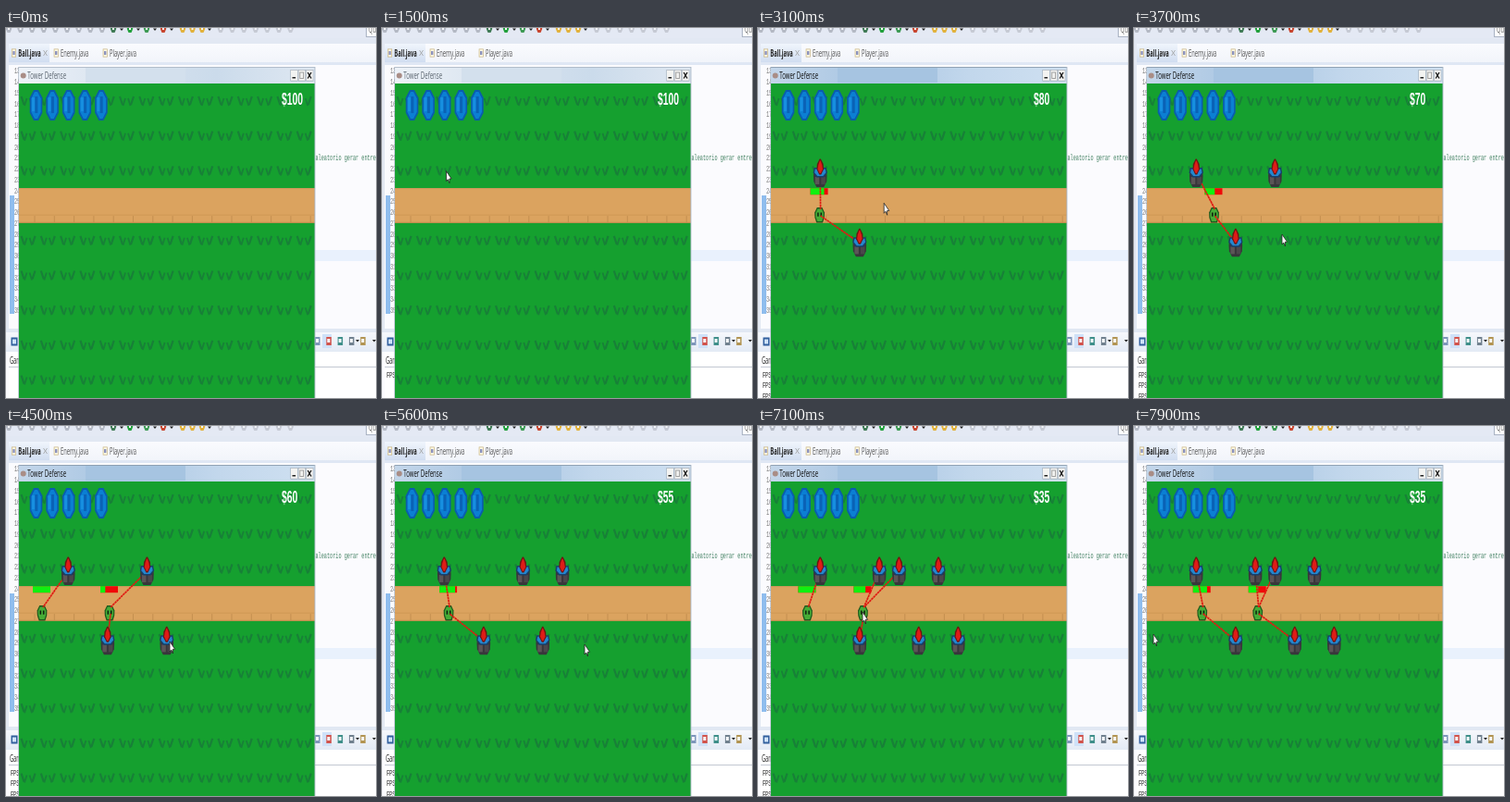
Write an HTML page with a canvas that moves like this. It is 400 px wide and 400 px high and loops after 8000 ms.

```html
<!DOCTYPE html>
<html lang="en">
<head>
<meta charset="utf-8">
<title>Tower Defense</title>
<style>
html, body { margin: 0; width: 100%; height: 100%; overflow: hidden; background: #fbfbfe; }
canvas { display: block; width: 400px; height: 400px; }
</style>
</head>
<body>
<canvas id="stage" width="400" height="400"></canvas>
<script>
const LOOP = 8000, STEP = 100, RANGE = 62;
const SQUEEZE = 0.565;              // the whole screen is narrowed sideways
const TILE_W = 21.3, TILE_H = 37.7;
const LEFT = 14, RIGHT = 334, WIDTH = RIGHT - LEFT, TITLE = 42, TOP = 60;
const LANE = 202;
const UI = '"Open Sans", sans-serif';
const MONO = '9.2px "Liberation Mono", monospace';
const stage = document.getElementById('stage').getContext('2d');
let c;

function box(color, x, y, w, h) {
  c.fillStyle = color;
  c.fillRect(x, y, w, h);
}

// Mirrored outline: half widths at even steps from top to bottom.
function shape(color, x, top, bottom, ...halves) {
  const y = i => top + (bottom - top) * i / (halves.length - 1);
  c.fillStyle = color;
  c.beginPath();
  halves.forEach((h, i) => c.lineTo(x + h, y(i)));
  for (let i = halves.length - 1; i >= 0; i--) c.lineTo(x - halves[i], y(i));
  c.fill();
}

function line(color, width, x0, y0, x1, y1) {
  c.strokeStyle = color;
  c.lineWidth = width;
  c.beginPath();
  c.moveTo(x0, y0);
  c.lineTo(x1, y1);
  c.stroke();
}

function text(str, x, y, font, color) {
  c.save();
  c.translate(x, y);
  c.scale(SQUEEZE, 1);
  c.font = font;
  c.fillStyle = color;
  c.fillText(str, 0, 0);
  c.restore();
}

function fade(x0, y0, x1, y1, ...colors) {
  const g = c.createLinearGradient(x0, y0, x1, y1);
  colors.forEach((k, i) => g.addColorStop(i / (colors.length - 1), k));
  return g;
}

function layer(draw) {
  const el = document.createElement('canvas');
  el.width = el.height = 400;
  c = el.getContext('2d');
  draw();
  return el;
}

// ---- editor behind the game ----

function arrow(x, y) {
  shape('#222', x, y - 1, y + 1.5, 2, 0);
}

function toolIcon(color, x) {
  shape(color, x, -3, 5, 3, 3.2, 1.5);
  box('#f4f6fa', x - 1, 0, 2, 2);
}

function toolbar() {
  box('#e4e9f4', 0, 0, 400, 11);
  for (let x = 3; x < 108; x += 12.6) toolIcon('#b4b9c4', x);
  for (let x = 232; x < 310; x += 12.6) toolIcon('#c6cad4', x);
  ['#3f7a55', '#22a03c', '#3d9a54', '#c8452f'].forEach((color, i) => {
    toolIcon(color, 116 + 18 * i);
    arrow(125 + 18 * i, 1.5);
  });
  for (let i = 0; i < 3; i++) toolIcon('#e2b23c', 191 + 10.5 * i);
  arrow(220, 1.5);
  box('#aab3c4', 389, 0, 11, 10);
  box('#fff', 390, 0, 10, 9);
  text('Qu', 392, 5, '10px ' + UI, '#666');
}

function tab(name, x, weight, color) {
  box('#cbb682', x - 7.3, 22.5, 5, 9);
  box('#fdf8e4', x - 6.6, 23.2, 3.6, 7.6);
  box('#8d93bd', x - 6, 25, 2.4, 4);
  text(name, x, 30.6, weight + '10.2px ' + UI, color);
}

function editor() {
  box('#fbfbfe', 0, 0, 400, 400);
  toolbar();
  box('#e2e8f3', 0, 11, 400, 6);
  box(fade(0, 17, 0, 38, '#fafbfe', '#f1f4fa'), 0, 17, 400, 21);
  box(fade(0, 17, 0, 38, '#f0f5fc', '#cfdcf0'), 3, 17, 44, 21);
  box('#dfe7f4', 0, 37, 400, 3);
  box('#e4e9f3', 0, 16, 3, 310);
  tab('Ball.java', 13.3, 'bold ', '#222');
  tab('Enemy.java', 59, '', '#555');
  tab('Player.java', 112, '', '#555');
  line('#999', 0.7, 40.5, 24, 44.5, 30);
  line('#999', 0.7, 44.5, 24, 40.5, 30);

  box('#e9f1fd', RIGHT, 240, 66, 12);
  box('#8fbdee', 4, 181, 5, 128);
  for (let n = 13; n <= 35; n++) text(n, 9, 49.3 + (n - 13) * 11.75, MONO, '#777');
  text('aleatorio gerar entre', RIGHT + 0.5, 143.3, MONO, '#3f7f5f');
}

function logView() {
  box('#e1e8f3', 0, 325, 400, 5);
  box(fade(0, 329, 0, 350, '#f6f8fc', '#e3eaf5'), 0, 329, 400, 21);
  box('#fff', 3, 350, 397, 50);
  box('#c3c8d2', 3, 366, 397, 1);
  box('#315f9d', 5.5, 334.5, 7, 9);
  box('#cfe3fb', 7, 336.5, 4, 5);
  text('Game', 4, 363.3, '10px ' + UI, '#222');
  box('#cfe1f8', 342, 331, 10, 15);
  ['#7d95ba', '#d2534b', '#3f8f8a', '#71818f', '#b29452'].forEach((color, i) => {
    const x = 337 + 12.3 * i;
    box(color, x - 3, 334, 5.5, 9);
    box('#f7f9fc', x - 2, 336, 3, 4);
  });
  arrow(380, 338);
  arrow(398, 338);
}

// ---- game window ----

function tuft(x, y) {
  for (const side of [-1, 1]) {
    line('#188038', 2.2, x + side * 7.5, y - 5, x + side * 4.5, y + 4);
    line('#188038', 1.8, x + side * 1.5, y - 3, x + side * 4, y + 5);
  }
}

function gem(x) {
  shape('#0a5cae', x, 67, 100, 2.5, 6.8, 6.8, 6.8, 2.5);
  shape('#0b7fd3', x, 69, 98, 1.5, 5.2, 5.2, 5.2, 1.5);
  box('#178fe0', x - 4.5, 75, 3, 15);
  box('#0a62b6', x - 1.2, 74, 3, 18);
}

function field() {
  box('#15a02f', LEFT, TOP, WIDTH, 340);
  for (let row = 0; row < 9; row++) {
    for (let x = LEFT + 10; x < RIGHT; x += TILE_W) tuft(x, 79 + row * TILE_H);
  }
  const road = TOP + 3 * TILE_H;
  box('#dba35f', LEFT, road, WIDTH, TILE_H);
  box('#d0975a', LEFT, road, WIDTH, 1);
  box('#cf9855', LEFT, road + 28.5, WIDTH, 1);
  box('#c08b4c', LEFT, road + 36.7, WIDTH, 1);
  for (let x = 30.5; x < RIGHT; x += TILE_W) box('#c48f50', x, road + 30, 1, 7);
  for (let i = 0; i < 5; i++) gem(32.5 + i * 17.6);
}

function titleBar(active) {
  const colors = active ? ['#c3d6ea', '#a8c5e2', '#c2d7ec', '#cfe0f1']
                        : ['#edf2f8', '#d8e3ef', '#cbdbeb', '#dfe8f2'];
  box(fade(LEFT, 0, RIGHT, 0, ...colors), LEFT, TITLE, WIDTH, 18);
  box(active ? '#a6c4e1' : '#d3e0ed', 86, 43, 108, 16);
  box(active ? '#8596a7' : '#a9b5c2', LEFT, TITLE, WIDTH, 0.8);
  c.fillStyle = '#a98d86';
  c.beginPath();
  c.arc(18.7, 51.5, 3, 0, 7);
  c.fill();
  text('Tower Defense', 23.3, 54.6, '10.7px ' + UI, active ? '#111' : '#5c6670');

  for (let i = 0; i < 3; i++) {
    box('#9aa5b2', 307.5 + 8.4 * i, 45, 8, 12.5);
    box('#f3f3f1', 308 + 8.4 * i, 45.6, 7, 11.2);
  }
  box('#222', 309.5, 53, 3.6, 1.5);
  c.strokeStyle = '#999';
  c.lineWidth = 0.9;
  c.strokeRect(317.8, 48, 3.8, 6.5);
  line('#111', 1.3, 326.2, 48, 330, 54.5);
  line('#111', 1.3, 330, 48, 326.2, 54.5);
  box('#a9b6c5', LEFT - 0.7, TITLE, 0.7, 358);
  box('#a9b6c5', RIGHT - 0.5, TITLE, 0.9, 358);
}

function tower({ x, y }) {
  shape('#38363b', x, y - 3, y + 15, 7, 7.3, 7, 4);
  box('#5b5557', x - 5.5, y + 4, 4.5, 8);
  box('#4b474b', x + 1, y + 4, 4.5, 8);
  shape('#173f6b', x, y - 6, y + 4.5, 6.5, 7.6, 4);
  shape('#2487cf', x, y - 4.5, y + 3, 5.5, 6.2, 3);
  shape('#6b1512', x, y - 15.5, y + 1.5, 0.6, 3.4, 3.8, 1);
  shape('#de1c17', x, y - 13.5, y, 0.4, 2, 2.7, 0.6);
}

function enemy(x) {
  shape('#1c5a1d', x, LANE - 8, LANE + 8.5, 2.8, 5.4, 5.2, 3.4);
  shape('#46ac36', x, LANE - 6.5, LANE + 7, 2.2, 4.2, 4, 2.5);
  for (const side of [-1, 1]) box('#0f240f', x - 0.8 + side * 1.7, LANE - 2.5, 1.6, 4.2);
}

function pointer({ x, y }) {
  c.beginPath();
  c.moveTo(x, y);
  c.lineTo(x, y + 11);
  c.lineTo(x + 1.7, y + 9);
  c.lineTo(x + 3.5, y + 13);
  c.lineTo(x + 3.4, y + 8.3);
  c.lineTo(x + 5.6, y + 8.3);
  c.closePath();
  c.fillStyle = '#fff';
  c.fill();
  c.strokeStyle = '#222';
  c.lineWidth = 0.8;
  c.stroke();
}

// ---- timeline ----

const place = (t, col, row) =>
  ({ t, x: LEFT + (col + 0.5) * TILE_W, y: TOP + (row + 0.5) * TILE_H + 2.7 });
const rest = (t, x, y) => ({ t, x, y });

const towers = [place(1700, 2, 2), place(2700, 4, 4), place(3400, 6, 2), place(4300, 7, 4),
  place(5200, 8, 2), place(5900, 9, 4), place(6900, 5, 2)];

// The pointer visits every building spot, with a few stops between.
const mouse = [rest(200, 340, 14), rest(1000, 70, 149), rest(2500, 112, 234), rest(3700, 160, 223),
  rest(4500, 177, 233), rest(5600, 219, 236), rest(7100, 113, 201), rest(7500, 80, 245),
  rest(7900, 21, 225), ...towers.map(p => rest(p.t, p.x + 2, p.y))].sort((a, b) => a.t - b.t);

const enemies = [
  { x: 46, hit: 2500, loss: 0.36 },
  { x: -27, hit: 4900, loss: 0.15 },
  { x: -87, hit: 7100, loss: 0.25 }
];

// Ground covered since 2.5 s; the game slows a little as it fills up.
function travel(t) {
  const s = (t - 2500) / 1000;
  return 34.9 * s - 0.95 * s * s;
}

function pointerAt(t) {
  const i = mouse.findIndex(p => p.t > t);
  if (i < 0) return mouse[mouse.length - 1];
  const a = mouse[i - 1], b = mouse[i], k = (t - a.t) / (b.t - a.t);
  return { x: a.x + (b.x - a.x) * k, y: a.y + (b.y - a.y) * k };
}

const back = layer(() => { editor(); logView(); });
const ground = layer(field);
const idle = layer(() => titleBar(false)), focused = layer(() => titleBar(true));

function render(time) {
  const t = Math.floor(time / STEP) * STEP;
  c = stage;
  c.drawImage(back, 0, 0);
  for (let i = 0; i < 3 && t >= 900 + 1000 * i; i++) text('FPS: 60', 5, 377.5 + i * 11.7, MONO, '#222');
  c.drawImage(ground, 0, 0);

  const built = towers.filter(p => t >= p.t);
  const alive = enemies
    .map(e => ({ x: e.x + travel(t), hp: Math.min(1, 1 - e.loss * (t - e.hit) / 1000) }))
    .filter(e => e.hp > 0);
  const kills = enemies.length - alive.length;

  c.save();
  c.beginPath();
  c.rect(LEFT, TOP, WIDTH - 0.5, 340);
  c.clip();
  for (const e of alive) {
    if (e.x < LEFT) continue;
    enemy(e.x);
    box('#f00808', e.x - 10, 173.2, 19, 7);
    box('#10f010', e.x - 10, 173.2, 19 * e.hp, 7);
  }
  c.setLineDash([2.6, 0.5]);
  for (const { x, y } of built) {
    const target = alive.filter(e => Math.hypot(e.x - x, LANE - y) < RANGE).pop();
    if (target) line('#e01a12', 1.7, x, y, target.x + 1, y < LANE ? LANE - 6 : LANE + 1);
  }
  c.setLineDash([]);
  built.forEach(tower);
  text('$' + (100 - 10 * built.length + 5 * kills), 298, 83.3,
    'bold 18.4px "Liberation Sans", sans-serif', '#fff');
  c.restore();

  c.drawImage(t >= towers[0].t ? focused : idle, 0, 0);
  if (t >= mouse[0].t) pointer(pointerAt(t));
}

const began = performance.now();
function tick() {
  render((performance.now() - began) % LOOP);
  requestAnimationFrame(tick);
}
tick();
</script>
</body>
</html>
```
